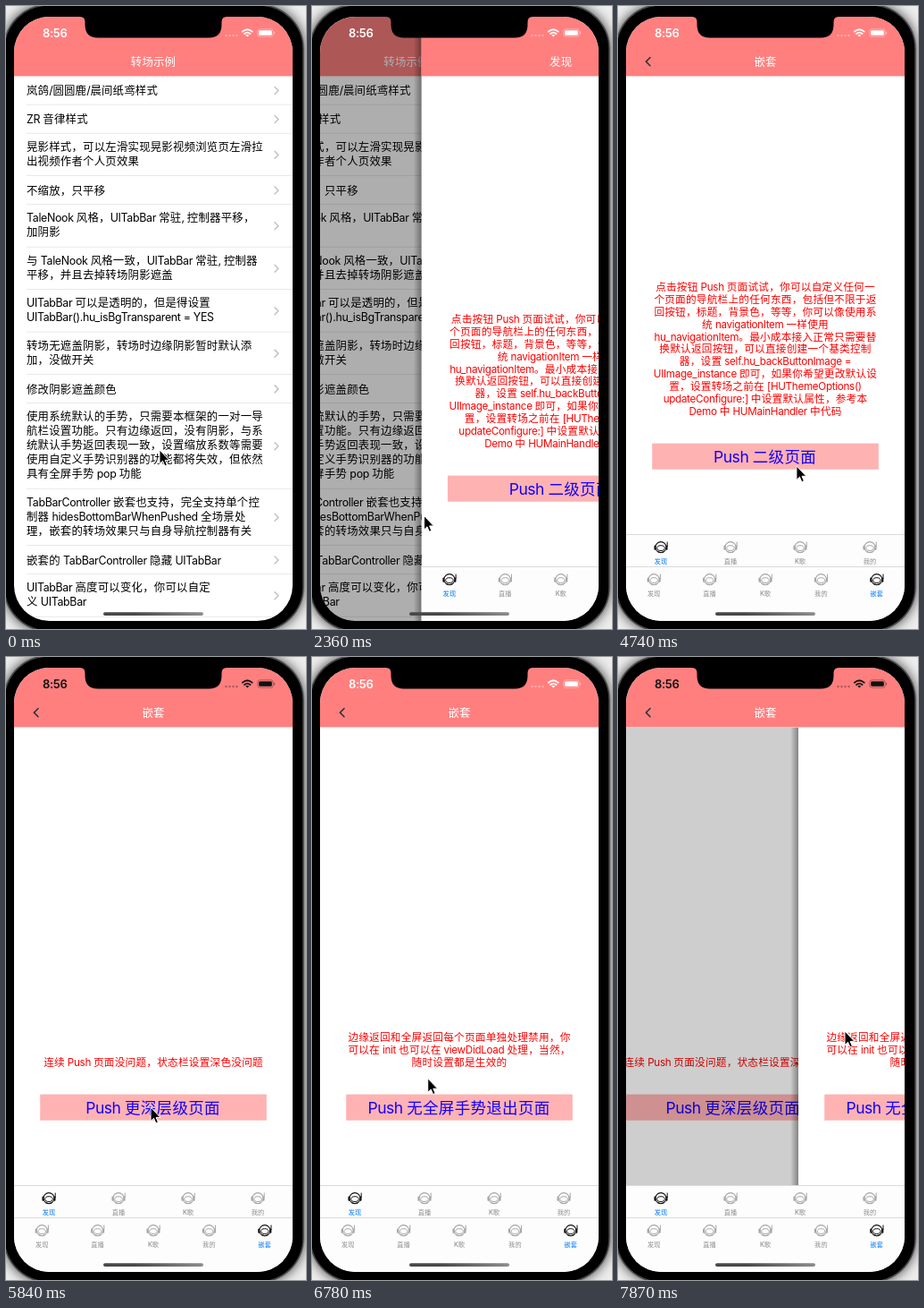
Recreate the animation shown at these times as an HTML page. Size 336 by 696 pixels, loop 8000 ms.

```html
<!DOCTYPE html>
<html lang="zh-CN">
<head>
<meta charset="utf-8">
<title>转场示例</title>
<style>
  html, body { margin: 0; width: 100%; height: 100%; overflow: hidden; background: #ccc; }
  svg { display: block; width: 336px; height: 696px; }
  text { font-family: Inter, "Noto Sans CJK SC", "Noto Sans CJK JP", "Noto Sans CJK", sans-serif; letter-spacing: .018em; }
  .latin { letter-spacing: -.026em; }
</style>
</head>
<body>
<svg id="stage" viewBox="0 0 336 696"></svg>
<script>
const LOOP = 8000;
const LEFT = 9, TOP = 12, WIDTH = 312, HEIGHT = 675, BAR = 78.4, INNER = 590, OUTER = 626;
const PINK = '#ff7f7f', BLUE = '#007aff';

// ---------- markup helpers ----------
const runs = s => s.replace(/[\x20-\x7e]+/g, m => `<tspan class="latin">${m}</tspan>`);

// y is the middle of the line
const text = (s, x, y, size, fill, extra = '') =>
  `<text x="${x}" y="${y + size * .37}" font-size="${size}" fill="${fill}" ${extra}>${runs(s)}</text>`;

const centered = (s, x, y, size, fill, weight = 400) =>
  text(s, x, y, size, fill, `text-anchor="middle" font-weight="${weight}"`);

const rect = (x, y, w, h, fill, extra = '') =>
  `<rect x="${x}" y="${y}" width="${w}" height="${h}" fill="${fill}" ${extra}/>`;

const stroke = (d, color, width) =>
  `<path d="${d}" fill="none" stroke="${color}" stroke-width="${width}" stroke-linecap="round" stroke-linejoin="round"/>`;

const group = (id, body, extra = '') => `<g id="${id}" ${extra}>${body}</g>`;

// A sheet can slide: it has an edge shadow and a dimming cover
const sheet = (id, y, h, body) => group(id,
  rect(LEFT - 9, y, 9, h, 'url(#edge)', 'class="shadow"') +
  rect(LEFT, y, WIDTH, h, '#fff') + body +
  rect(LEFT, y, WIDTH, h, '#000', 'class="dim" opacity="0"'));

const navBar = title =>
  rect(LEFT, TOP, WIDTH, BAR - TOP, PINK) + centered(title, 165, 62, 12.4, '#fff', 500);

// ---------- list ----------
const rows = [
  '岚鸽/圆圆鹿/晨间纸鸢样式',
  'ZR 音律样式',
  '晃影样式，可以左滑实现晃影视频浏览页左滑拉|出视频作者个人页效果',
  '不缩放，只平移',
  'TaleNook 风格，UITabBar 常驻, 控制器平移，|加阴影',
  '与 TaleNook 风格一致，UITabBar 常驻, 控制器|平移，并且去掉转场阴影遮盖',
  'UITabBar 可以是透明的，但是得设置|UITabBar().hu_isBgTransparent = YES',
  '转场无遮盖阴影，转场时边缘阴影暂时默认添|加，没做开关',
  '修改阴影遮盖颜色',
  '使用系统默认的手势，只需要本框架的一对一导|航栏设置功能。只有边缘返回，没有阴影，与系|统默认手势返回表现一致，设置缩放系数等需要|使用自定义手势识别器的功能都将失效，但依然|具有全屏手势 pop 功能',
  'TabBarController 嵌套也支持，完全支持单个控|制器 hidesBottomBarWhenPushed 全场景处|理，嵌套的转场效果只与自身导航控制器有关',
  '嵌套的 TabBarController 隐藏 UITabBar',
  'UITabBar 高度可以变化，你可以自定|义 UITabBar'
];

function listBody() {
  const step = 16.05;
  let y = BAR, out = '';
  for (const row of rows) {
    const lines = row.split('|');
    const h = Math.max(32.07, lines.length * step + 15.35);
    const mid = y + h / 2;
    const lift = lines.length > 1 ? 1 : -.2;
    lines.forEach((s, i) => {
      out += text(s, 23, mid - lift + (i - (lines.length - 1) / 2) * step, 12.4, '#000');
    });
    out += stroke(`M301 ${mid - 4}l4 4l-4 4`, '#c2c2c5', 1.5);
    y += h;
    out += rect(23, y - .7, LEFT + WIDTH - 23, .7, '#dedee0');
  }
  return out + navBar('转场示例');
}

// ---------- tab bars ----------
const headset = (x, y, c) => `<g transform="translate(${x} ${y})">` +
  `<circle r="6" fill="none" stroke="${c}" stroke-width="1.1"/>` +
  `<ellipse cy="1" rx="4.2" ry="2.9" fill="none" stroke="${c}" stroke-width="1"/>` +
  stroke('M-6.6 -1.2v3.4M6.6 -1.2v3.4', c, 1.9) +
  stroke('M7.2 -1V-5.6M-3.5 5.2Q0 7 3.5 5.2', c, 1) + '</g>';

function tabBar(y, h, names, active) {
  const w = WIDTH / names.length;
  let out = rect(LEFT, y, WIDTH, h, '#fdfdfd') + rect(LEFT, y, WIDTH, .8, '#d4d4d6');
  names.forEach((name, i) => {
    const x = LEFT + w * (i + .5), on = i === active;
    out += headset(x, y + 14.6, on ? '#111' : '#a6a6a6') +
      centered(name, x, y + 30.8, 7.2, on ? BLUE : '#8e8e93', 500);
  });
  return out;
}

// ---------- pages ----------
function pageBody(message, button) {
  const lines = message.split('|');
  return lines.map((s, i) =>
    centered(s, 165, 452.6 - (lines.length - 1 - i) * 13.9, 11.66, '#f00')).join('') +
    rect(38.2, 488.6, 253.6, 29.1, '#ffb2b2') + centered(button, 164.5, 503.3, 17.5, '#1400ff');
}

const guide = '点击按钮 Push 页面试试，你可以自定义任何一|个页面的导航栏上的任何东西，包括但不限于返|回按钮，标题，背景色，等等，你可以像使用系|统 navigationItem 一样使用|hu_navigationItem。最小成本接入正常只需要替|换默认返回按钮，可以直接创建一个基类控制|器，设置 self.hu_backButtonImage =|UIImage_instance 即可，如果你希望更改默认设|置，设置转场之前在 [HUThemeOptions()|updateConfigure:] 中设置默认属性，参考本|Demo 中 HUMainHandler 中代码';
const first = pageBody(guide, 'Push 二级页面');
const second = pageBody('连续 Push 页面没问题，状态栏设置深色没问题', 'Push 更深层级页面');
const third = pageBody('边缘返回和全屏返回每个页面单独处理禁用，你|可以在 init 也可以在 viewDidLoad 处理，当然，|随时设置都是生效的', 'Push 无全屏手势退出页面');

const tabs = ['发现', '直播', 'K歌', '我的', '嵌套'];
const inner = (id, body) => sheet(id, BAR, INNER - BAR, body);
const bottom = TOP + HEIGHT - OUTER;

const home = group('home',
  `<g transform="translate(0 36)">${first}</g>` + navBar('发现') + tabBar(OUTER, bottom, tabs, 0));

const nested = group('nested',
  `<g clip-path="url(#pages)">${inner('one', first)}${inner('two', second)}${inner('three', third)}</g>` +
  navBar('嵌套') + stroke('M36 57.5l-4.6 4.6l4.6 4.6', '#333', 1.6) +
  tabBar(INNER, OUTER - INNER, tabs.slice(0, 4), 0) + tabBar(OUTER, bottom, tabs, 4));

// ---------- device ----------
const signal = [246.5, 250.5, 254.5, 258.5]
  .map(x => `<circle cx="${x}" cy="33" r="1.2" fill="currentColor" opacity=".35"/>`).join('');

const status = group('status',
  text('8:56', 41, 30, 13, 'currentColor', 'font-weight="600"') + signal +
  stroke('M264.8 28.6Q270.3 23.9 275.8 28.6M267 31Q270.3 28.2 273.6 31', 'currentColor', 1.7) +
  '<path d="M270.3 34.6l-2-2.1q2 -1.5 4 0z" fill="currentColor"/>' +
  '<rect x="281.8" y="25.8" width="17.4" height="8.4" rx="2.5" fill="none" stroke="currentColor" stroke-width=".8" opacity=".45"/>' +
  rect(283.2, 27.2, 14.6, 5.6, 'currentColor', 'rx="1.4"') +
  rect(300, 28.6, 1.1, 2.8, 'currentColor', 'rx=".5" opacity=".45"'));

const notch = '<path d="M83 11H247V12Q241.500 12 241.500 18V21Q241.500 35.500 227 35.500H103Q88.500 35.500 88.500 21V18Q88.500 12 83 12Z"/>';

const stage = document.getElementById('stage');
stage.innerHTML = `<defs>
  <clipPath id="screen"><rect x="${LEFT}" y="${TOP}" width="${WIDTH}" height="${HEIGHT}" rx="39.5"/></clipPath>
  <clipPath id="pages"><rect x="${LEFT}" y="${BAR}" width="${WIDTH}" height="${INNER - BAR}"/></clipPath>
  <linearGradient id="edge"><stop offset="0" stop-opacity="0"/><stop offset="1" stop-opacity=".36"/></linearGradient>
  <linearGradient id="bar"><stop offset=".3" stop-color="#484848"/><stop offset="1" stop-color="#8c8c8c"/></linearGradient>
  <filter id="soft"><feGaussianBlur stdDeviation="7"/></filter>
</defs>` +
  rect(0, 0, 336, 696, '#ececec') +
  rect(-2, -1, 335, 699, '#000', 'rx="49" opacity=".85" filter="url(#soft)"') +
  rect(-2, -1, 335, 699, '#000', 'rx="49" stroke="#4a4a4c" stroke-width="1.6"') +
  `<g clip-path="url(#screen)">` +
  sheet('list', TOP, HEIGHT, listBody()) +
  sheet('tabs', TOP, HEIGHT, home + nested) +
  status + notch + rect(109, 677.2, 112, 3.8, 'url(#bar)', 'rx="1.9"') + '</g>' +
  '<path id="cursor" d="M0 0V15.500L3.500 12.300L5.900 17.800L8.400 16.700L6.100 11.400H10.900Z" stroke="#fff" stroke-width="1" stroke-linejoin="round"/>';

// ---------- motion ----------
const el = {};
for (const id of ['list', 'tabs', 'home', 'nested', 'one', 'two', 'three', 'status', 'cursor'])
  el[id] = document.getElementById(id);

const show = (node, on) => node.style.display = on ? '' : 'none';

function place(node, x, dim, shadow) {
  show(node, true);
  node.setAttribute('transform', `translate(${x} 0)`);
  node.querySelector(':scope > .dim').setAttribute('opacity', dim);
  show(node.querySelector(':scope > .shadow'), shadow);
}

// The upper sheet covers the lower one, which trails at 30 %
function stack(under, over, p) {
  show(under, p < 1);
  show(over, p > 0);
  if (p < 1) place(under, -.3 * WIDTH * p, .5 * p, false);
  if (p > 0) place(over, WIDTH * (1 - p), 0, p < 1);
}

const held = (t, steps) => steps.reduce((a, s) => t >= s ? s : a, 0);

// Screen updates arrive in coarse steps while a sheet slides
function push(t, steps) {
  const at = held(t, steps);
  if (!at) return 0;
  if (at === steps[steps.length - 1]) return 1;
  return 1 - (1 - (at - steps[0] + 20) / 490) ** 3;
}

const openTabs = [2240, 2300, 2360, 2510, 2680];
const openSecond = [5010, 5085, 5160, 5310, 5490];
const openThird = [6020, 6125, 6230, 6410];
const dragSteps = [7200, 7255, 7310, 7370, 7520, 7690, 7870];

// time, x, y of the pointer tip
const path = [
  [0, 172, 496], [30, 172, 496], [470, 160, 526], [690, 160, 526], [1290, 138, 580],
  [1410, 138, 580], [1730, 125.5, 569.5], [2990, 125.5, 569.5], [3140, 282.5, 632], [3250, 301, 638],
  [3470, 291, 637], [4250, 291, 637], [4740, 200, 514], [4860, 192, 503], [5680, 192, 503],
  [5840, 162, 503], [6600, 162, 503], [6780, 130, 471], [7050, 57, 425], [7150, 57, 425],
  [7870, 254, 418], [LOOP, 254, 418]
];

function pointer(t) {
  const i = path.findIndex(k => k[0] > t);
  const [t0, x0, y0] = path[i - 1], [t1, x1, y1] = path[i];
  const u = (t - t0) / (t1 - t0);
  return [x0 + (x1 - x0) * u, y0 + (y1 - y0) * u];
}

function draw(t) {
  const drag = held(t, dragSteps);
  const [x, y] = pointer(drag || t);
  el.cursor.setAttribute('transform', `translate(${x} ${y})`);

  stack(el.list, el.tabs, push(t, openTabs));
  show(el.home, t < 3670);
  show(el.nested, t >= 3670);

  show(el.one, false);
  show(el.two, false);
  show(el.three, false);
  if (t < openThird[0]) stack(el.one, el.two, push(t, openSecond));
  else stack(el.two, el.three, drag ? 1 - (x - 61) / WIDTH : push(t, openThird));

  const dark = (t >= openSecond[0] && t < openThird[0]) || drag;
  el.status.style.color = dark ? '#111' : '#fff';
}

const start = performance.now();
function tick() {
  draw((performance.now() - start) % LOOP);
  requestAnimationFrame(tick);
}
tick();
</script>
</body>
</html>
```
